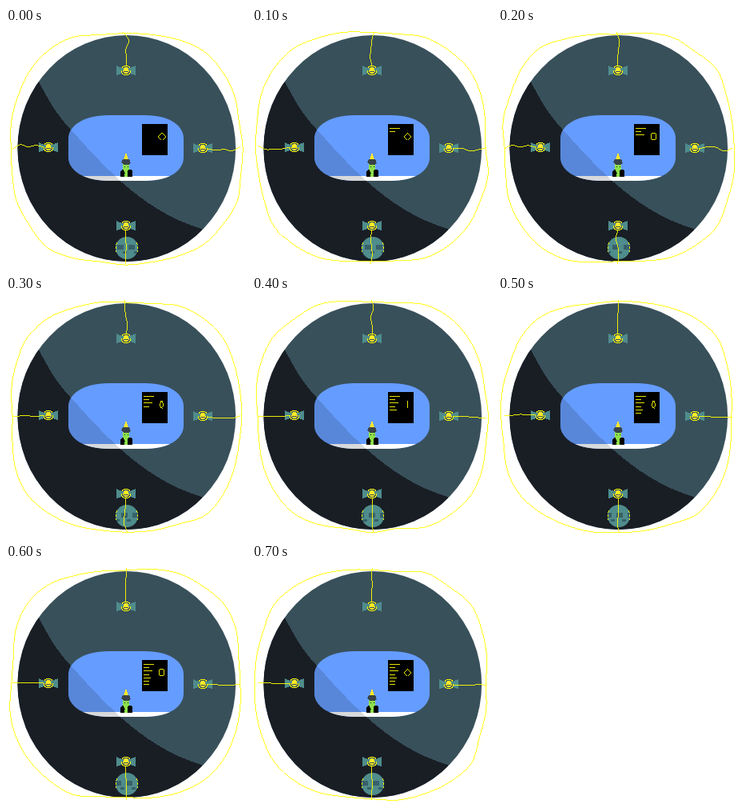
An HTML page that plays this animation: 300 px wide and 300 px high, repeating every 0.8 s.

```html
<!DOCTYPE html>
<html lang="en">
<head>
<meta charset="utf-8">
<title>Electric porthole</title>
<style>
html, body { margin: 0; height: 100%; overflow: hidden; background: #fff; }
svg { display: block; width: 100vw; height: 100vh; }
.line { fill: none; stroke: #ff0; stroke-width: .9; }
</style>
</head>
<body>
<svg viewBox="0 0 300 300" shape-rendering="crispEdges">
  <defs>
    <clipPath id="disc"><ellipse cx="150.8" cy="150.5" rx="136.3" ry="141.5"/></clipPath>
    <clipPath id="pane"><path d="M78 138C78 123 96 109 128 109H174C206 109 222 123 222 138V162C222 177 206 191 174 191H128C96 191 78 177 78 162Z"/></clipPath>
    <clipPath id="ball"><circle cx="151" cy="275" r="14"/></clipPath>
    <path id="shade" d="M41 67C58 100 68 113 80 126C112 160 165 228 245 251V300H0V67Z"/>
    <g id="lamp">
      <path d="M-12-6L-5-3H5L12-6V6L5 4H-5L-12 6Z" fill="#4f8c8c"/>
      <circle r="6" fill="#3a5058" stroke="#ff0"/>
      <circle r="4" fill="#ffe926"/>
      <path d="M-7-1.5H-3M3-1.5H7" stroke="#4f8c8c" stroke-width="3"/>
      <path d="M-3 1H3" stroke="#3a5058"/>
    </g>
  </defs>
  <g clip-path="url(#disc)">
    <rect width="300" height="300" fill="#38505a"/>
    <use href="#shade" fill="#191e25"/>
  </g>
  <g clip-path="url(#pane)">
    <rect width="300" height="300" fill="#659cff"/>
    <rect y="185" width="300" height="10" fill="#fff"/>
    <use href="#shade" fill="#191e25" opacity=".17"/>
  </g>
  <rect x="170" y="120" width="32" height="39" fill="#000"/>
  <path id="text" class="line" stroke-width="1"/>
  <path id="gem" class="line"/>
  <g>
    <path d="M143 186V179L145 177H156L158 179V186Z" fill="#000"/>
    <path d="M146 170H154V176L152 179V186H148V180L146 176Z" fill="#8ce04a"/>
    <path d="M148 173H149M152 173H153M148 181H149" stroke="#191e25"/>
    <path d="M146 164H154L156 169L153 171H147L144 168Z" fill="#39434a"/>
    <path d="M150 156L153 164H147Z" fill="#ffe926"/>
  </g>
  <g clip-path="url(#ball)">
    <rect x="137" y="261" width="28" height="28" fill="#4f8c8c"/>
    <path id="marks" fill="#38606a"/>
  </g>
  <path class="line" d="M139 268Q135 275 139 282M163 268Q167 275 163 282" stroke-dasharray="3 2"/>
  <use href="#lamp" x="150" y="53"/>
  <use href="#lamp" x="53" y="149"/>
  <use href="#lamp" x="246" y="150"/>
  <use href="#lamp" x="150" y="247"/>
  <path id="wires" class="line"/>
  <path id="halo" class="line"/>
</svg>
<script>
const STEPS = 8, STEP_MS = 100;
const set = (id, d) => document.getElementById(id).setAttribute('d', d);
const range = n => [...Array(n).keys()];

// start at the halo, end at the lamp
const wireEnds = [[150, 5, 150, 47], [8, 149, 47, 149], [293, 151, 252, 151], [150, 295, 150, 253]];

// seeded random number from -1 to 1
function noise(n) {
  const v = Math.sin(n * 127.1 + 5) * 43758.5;
  return 2 * (v - Math.floor(v)) - 1;
}

// smooth line through points
function curve(pts, closed) {
  const n = pts.length;
  const at = i => pts[closed ? (i + n) % n : Math.max(0, Math.min(n - 1, i))];
  let d = 'M' + pts[0];
  for (let i = 0; i < (closed ? n : n - 1); i++) {
    const [a, b, c, e] = [at(i - 1), at(i), at(i + 1), at(i + 2)];
    const c1 = b.map((v, j) => v + (c[j] - a[j]) / 6);
    const c2 = c.map((v, j) => v - (e[j] - b[j]) / 6);
    d += `C${c1} ${c2} ${c}`;
  }
  return d;
}

// wobbling ring, wider towards the corners
function halo(step) {
  const n = 28;
  return curve(range(n).map(i => {
    const a = i / n * 2 * Math.PI;
    const r = 144 + 13 * Math.sin(2 * a) ** 2 + 2.5 * noise(step * n + i);
    return [150 + r * Math.cos(a), 150 + r * Math.sin(a)];
  }), true);
}

// the wires calm down during the loop
function wire([x, y, x2, y2], w, step) {
  const size = 4 * (1 - step / STEPS);
  return curve(range(5).map(i => {
    const bend = i < 4 ? size * noise(step * 20 + w * 4 + i + 300) : 0;
    return [
      x + (x2 - x) * i / 4 + (x === x2 ? bend : 0),
      y + (y2 - y) * i / 4 + (y === y2 ? bend : 0)
    ];
  }));
}

function text(step) {
  const count = step && Math.min(step + 1, 7);
  return range(count).map(i => `M172 ${125.5 + Math.round(i * 4.2)}h${i % 2 ? 7 : 13 - i}`).join('');
}

// spinning diamond
function gem(step) {
  const x = 194.5, y = 135.5, h = 4.5;
  const w = h * Math.abs(Math.cos(step / STEPS * Math.PI));
  if (w < .1) return `M${x} ${y - h}V${y + h}`;
  if (w > 4) return `M${x - w} ${y}L${x} ${y - h}L${x + w} ${y}L${x} ${y + h}Z`;
  return `M${x - w} ${y}A${w} ${h} 0 0 1 ${x + w} ${y}A${w} ${h} 0 0 1 ${x - w} ${y}`;
}

// two rows of patches sliding round the ball
function marks(step) {
  const shift = step * 14 / STEPS;
  return range(4).map(i => `M${125 + i * 14 + shift} 271h8v6h-8zM${132 + i * 14 + shift} 279h5v3h-5z`).join('');
}

let last = -1;
function draw() {
  const step = Math.floor(performance.now() / STEP_MS) % STEPS;
  if (step !== last) {
    last = step;
    set('halo', halo(step));
    set('wires', wireEnds.map((ends, w) => wire(ends, w, step)).join(''));
    set('text', text(step));
    set('gem', gem(step));
    set('marks', marks(step));
  }
  requestAnimationFrame(draw);
}
draw();
</script>
</body>
</html>
```
